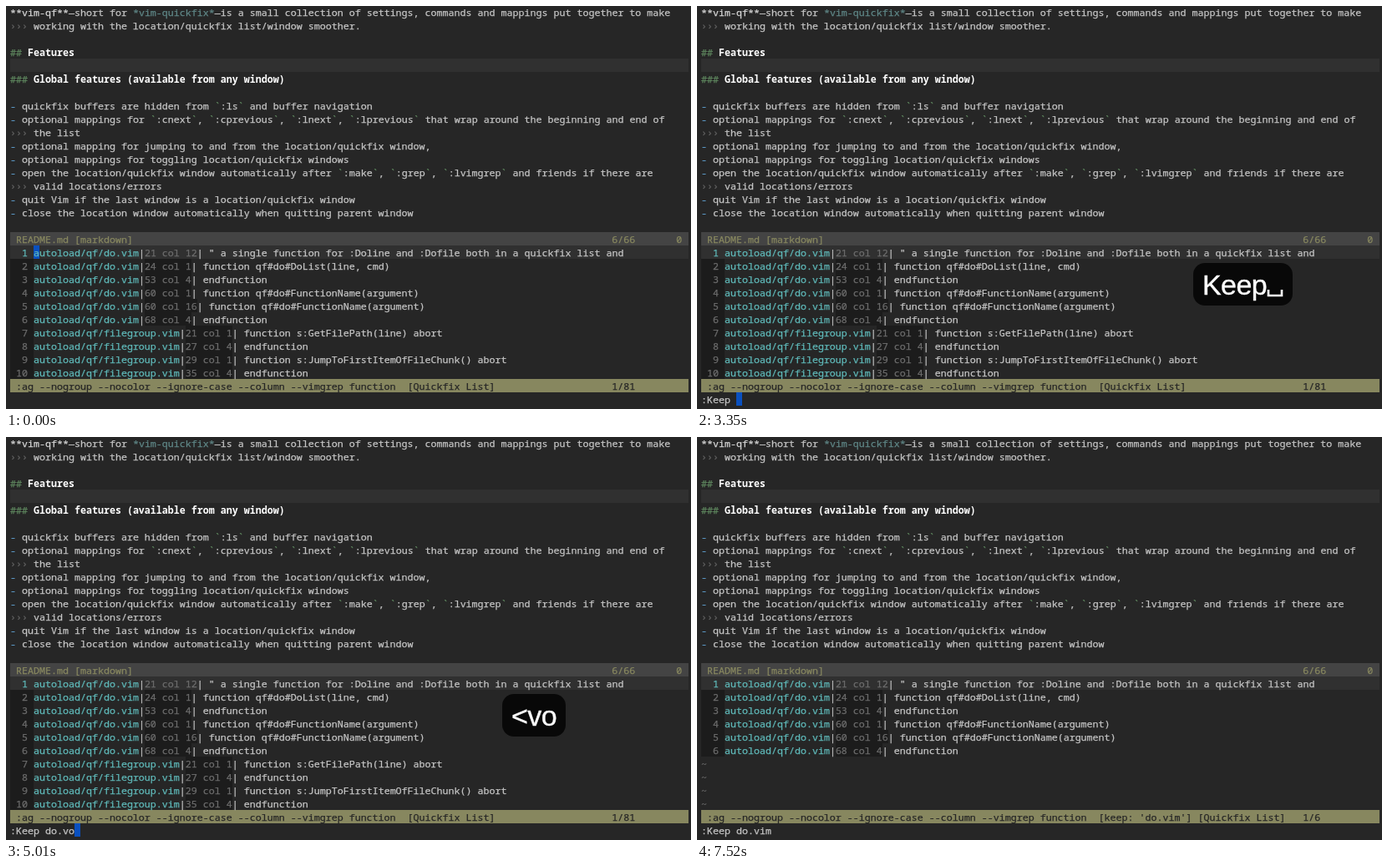
An HTML page for the animation above (8000 ms loop, 820 px wide and 483 px high).

```html
<!DOCTYPE html>
<html lang="en">
<head>
<meta charset="utf-8">
<title>Filtering the quickfix list</title>
<style>
  html, body { margin: 0; width: 100%; height: 100%; overflow: hidden; background: #262626; }
  #stage { position: relative; width: 820px; height: 483px; overflow: hidden; background: #262626; }
  #term {
    position: absolute; left: 5px; top: -1px; width: 812px;
    font: 11.667px/18px "Noto Sans Mono", "DejaVu Sans Mono", monospace;
    font-variant-ligatures: none; white-space: pre; color: #c6c6c6;
    -webkit-text-stroke: .25px currentColor;
  }
  .row { height: 16px; }
  .row span { display: inline-block; height: 16px; vertical-align: top; }
  .line { background: #303030; }
  .idle { background: #444; color: #87875f; }
  .active { background: #87875f; color: #262626; }
  .bold { color: #d8d8d8; }
  .em { color: #5f8787; }
  .mark { color: #5f875f; }
  .title { color: #fff; font-weight: 600; -webkit-text-stroke: 0; }
  .dash { color: #5f9fcf; }
  .dim { color: #626262; }
  .file { color: #5fb9b9; }
  .num { background: #1c1c1c; color: #6c6c6c; }
  .line .num { background: none; }
  .cur { color: #5fb9b9; }
  .block { background: #0a50bf; }
  .pill {
    position: absolute; left: 594px; height: 51px; padding: 0 11px;
    border-radius: 14px; background: rgba(0, 0, 0, .79); color: #fff;
    font: 34px/53px "Liberation Sans", Arial, sans-serif; letter-spacing: -.6px; white-space: pre;
    -webkit-text-stroke: .4px #fff;
  }
  .pill svg { height: 24px; overflow: visible; vertical-align: baseline; fill: none; stroke: #fff; stroke-width: 2.6; }
</style>
</head>
<body>
<div id="stage">
  <div id="term"></div>
  <div id="pills"></div>
</div>
<script>
const LOOP = 8000;
const span = (cls, text) => `<span class="${cls}">${text}</span>`;
const row = (html, cls = '') => `<div class="row ${cls}">${html}</div>`;
const icon = (w, d) => `<svg width="${w}" viewBox="0 0 ${w} 24"><path d="${d}"/></svg>`;

const SPACE = icon(20, 'M2 18v7h16v-7');
const ERASE = icon(41, 'M2.5 12.5L13 2.5H38V23H13ZM18.5 6.5L31 19M31 6.5L18.5 19');
const ENTER = icon(33, 'M17 1H24.5Q29 1 29 5.5Q29 10.5 24.5 10.5H6M13 3.5L5.5 10.5L13 17.5');

const wrap = span('dim', '›››') + ' ';
const item = text => row(span('dash', '-') + ' ' + text.replace(/`/g, span('mark', '`')));
const head = (marks, text) => row(span('mark', marks) + ' ' + span('title', text));

const readme = [
  row(span('bold', '**vim-qf**') + '—short for ' + span('em', '*vim-quickfix*') +
    '—is a small collection of settings, commands and mappings put together to make'),
  row(wrap + 'working with the location/quickfix list/window smoother.'),
  row(''),
  head('##', 'Features'),
  row('', 'line'),
  head('###', 'Global features (available from any window)'),
  row(''),
  item('quickfix buffers are hidden from `:ls` and buffer navigation'),
  item('optional mappings for `:cnext`, `:cprevious`, `:lnext`, `:lprevious` that wrap around the beginning and end of'),
  row(wrap + 'the list'),
  item('optional mapping for jumping to and from the location/quickfix window,'),
  item('optional mappings for toggling location/quickfix windows'),
  item('open the location/quickfix window automatically after `:make`, `:grep`, `:lvimgrep` and friends if there are'),
  row(wrap + 'valid locations/errors'),
  item('quit Vim if the last window is a location/quickfix window'),
  item('close the location window automatically when quitting parent window'),
  row(''),
  row(' README.md [markdown]'.padEnd(103) + '6/66'.padEnd(11) + '0', 'idle')
].join('');

const matches = [
  ['do', '21 col 12', '" a single function for :Doline and :Dofile both in a quickfix list and'],
  ['do', '24 col 1', 'function qf#do#DoList(line, cmd)'],
  ['do', '53 col 4', 'endfunction'],
  ['do', '60 col 1', 'function qf#do#FunctionName(argument)'],
  ['do', '60 col 16', 'function qf#do#FunctionName(argument)'],
  ['do', '68 col 4', 'endfunction'],
  ['filegroup', '21 col 1', 'function s:GetFilePath(line) abort'],
  ['filegroup', '27 col 4', 'endfunction'],
  ['filegroup', '29 col 1', 'function s:JumpToFirstItemOfFileChunk() abort'],
  ['filegroup', '35 col 4', 'endfunction']
];

// Each group of key presses shares one pill: [time, typed, label]
const groups = [
  { end: 2640, keys: [[1560, ':']] },
  { end: 4420, keys: [[2640, 'K'], [2750, 'e'], [2990, 'e'], [3110, 'p'], [3350, ' ', SPACE]] },
  { end: 5010, keys: [[3820, 'd'], [3940, 'o']] },
  { end: 7040, keys: [[4540, '.', '&lt;'], [4890, 'v'], [5010, 'o'], [5370, '\b', ERASE], [5730, 'i'], [5960, 'm']] },
  { end: 7520, keys: [[6440, '', ENTER]] }
];
const SUBMIT = 6440;

function list(filtered, cursor) {
  const rows = matches.map(([name, pos, text], i) => {
    if (filtered && name !== 'do') return row(span('dim', '~'));
    const path = `autoload/qf/${name}.vim`;
    const file = cursor && i === 0
      ? span('file block', path[0]) + span('file', path.slice(1))
      : span('file', path);
    const no = span(i ? 'num' : 'cur', String(i + 1).padStart(3) + ' ');
    return row(`${no}${file}|${span('num', pos)}| ${text}`, i ? '' : 'line');
  });
  const title = ' :ag --nogroup --nocolor --ignore-case --column --vimgrep function  ' +
    (filtered ? "[keep: 'do.vim'] " : '') + '[Quickfix List]';
  return rows.join('') + row(title.padEnd(103) + (filtered ? '1/6' : '1/81'), 'active');
}

function command(t) {
  let text = '';
  for (const { keys } of groups)
    for (const [at, ch] of keys)
      if (at <= t) text = ch === '\b' ? text.slice(0, -1) : text + ch;
  return row(text + (text && t < SUBMIT ? span('block', ' ') : ''));
}

function pills(t) {
  const shown = groups.filter(g => g.keys[0][0] <= t && t < g.end);
  return shown.map((g, i) => {
    const label = g.keys.filter(k => k[0] <= t).map(k => k[2] || k[1]).join('');
    return `<div class="pill" style="top:${308 - 61 * (shown.length - 1 - i)}px">${label}</div>`;
  }).join('');
}

const painted = {};
function paint(id, html) {
  if (painted[id] === html) return;
  painted[id] = html;
  document.getElementById(id).innerHTML = html;
}

function draw(now) {
  const t = now % LOOP;
  const cursor = t < 120 || (t >= 600 && t < 1080) || (t >= SUBMIT && t < 7520);
  paint('term', readme + list(t >= SUBMIT, cursor) + command(t));
  paint('pills', pills(t));
}

const start = performance.now();
function tick() {
  draw(performance.now() - start);
  requestAnimationFrame(tick);
}
tick();
</script>
</body>
</html>
```
